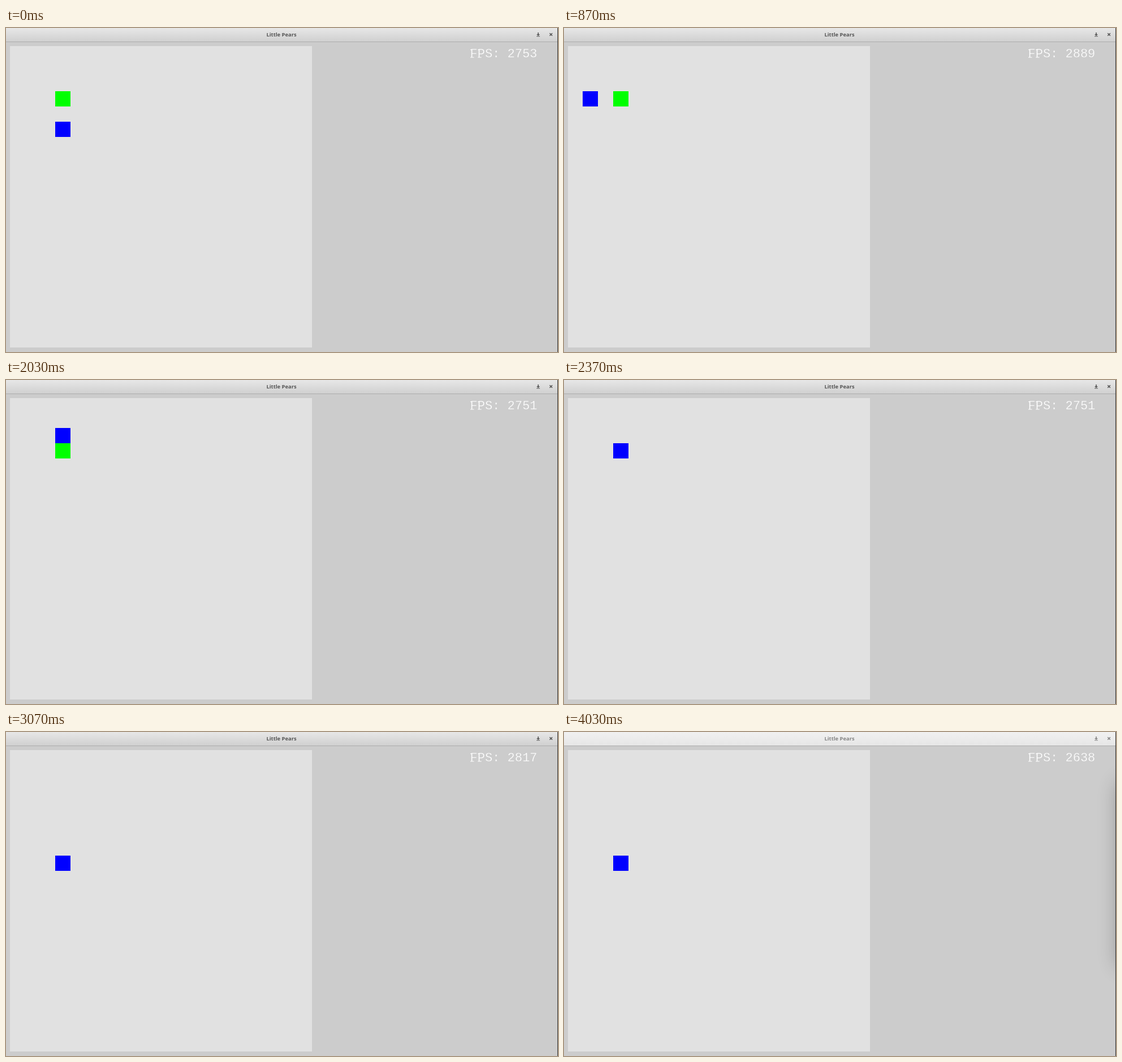
These frames come from a looping animation (976 px wide and 574 px high, 4.46 s). An HTML page:

```html
<!DOCTYPE html>
<html lang="en">
<head>
<meta charset="utf-8">
<title>Little Pears</title>
<style>
  html, body { margin: 0; width: 100%; height: 100%; overflow: hidden; background: #ccc; }
  svg { display: block; overflow: hidden; }
  .title { font: bold 9.4px "Open Sans", "Noto Sans", sans-serif; text-anchor: middle; }
  .fps { font: 22px "Liberation Mono", monospace; fill: #fff; white-space: pre;
    stroke: #ccc; stroke-width: .4px; }
</style>
</head>
<body>
<svg width="976" height="574" viewBox="0 0 976 574">
  <defs>
    <linearGradient id="active" x2="0" y2="1">
      <stop stop-color="#e7e7e7"/><stop offset="1" stop-color="#d0d0d0"/>
    </linearGradient>
    <linearGradient id="idle" x2="0" y2="1">
      <stop stop-color="#f1f1f1"/><stop offset="1" stop-color="#e6e6e6"/>
    </linearGradient>
    <filter id="soft" x="-1" y="-1" width="3" height="3">
      <feGaussianBlur stdDeviation="18"/>
    </filter>
    <g id="bar">
      <rect width="976" height="24"/>
      <text class="title" x="487" y="15" fill="currentColor">Little Pears</text>
      <path d="M940.2 8h1.6v3h2.2l-3 3l-3-3h2.2zM938 14.2h6v1h-6z" fill="currentColor"/>
      <path d="M961.3 9.2l4.6 4.6M965.9 9.2l-4.6 4.6" stroke="currentColor" stroke-width="1.6"/>
    </g>
  </defs>

  <use href="#bar" fill="url(#active)" color="#555"/>
  <g id="blurred">
    <use href="#bar" fill="url(#idle)" color="#858585"/>
    <rect x="980" y="90" width="100" height="325" opacity=".3" filter="url(#soft)"/>
  </g>
  <rect y="24" width="976" height="1" fill="#adadad"/>
  <rect x="975" width="1" height="574" fill="#333"/>

  <rect x="7" y="32" width="534" height="534" fill="#e1e1e1"/>
  <rect id="fruit" width="27" height="27" fill="#0f0"/>
  <rect id="player" width="27" height="27" fill="#00f"/>

  <text class="fps" id="fps" x="820.5" y="52.4"></text>
  <path d="M821 52h6.5M834.2 52h6.5M821 38.6h3M834.2 38.6h3" stroke="#fff"/>
</svg>
<script>
const LOOP = 4460, CELL = 26.7, STEP = 207;
const FRUIT = [3, 3], HOME = [3, 5];
const DIRS = { L: [-1, 0], R: [1, 0], U: [0, -1], D: [0, 1] };
const LEGS = [{ start: 200, path: "LLUUUURR" }, { start: 2030, path: "DDDDDD" }];
const RATES = [2753, 2889, 2801, 2751, 2817, 2638];
const el = id => document.getElementById(id);

function place(node, [col, row]) {
  node.setAttribute("x", Math.round(6.7 + col * CELL));
  node.setAttribute("y", Math.round(32 + row * CELL));
}

// Follow the route up to time t, noting whether the fruit was reached.
function walk(t) {
  let [col, row] = HOME, eaten = false;
  for (const { start, path } of LEGS) {
    const count = Math.max(0, Math.floor((t - start) / STEP) + 1);
    for (const key of path.slice(0, count)) {
      col += DIRS[key][0];
      row += DIRS[key][1];
      eaten ||= col === FRUIT[0] && row === FRUIT[1];
    }
  }
  return { pos: [col, row], eaten };
}

function draw(t) {
  const { pos, eaten } = walk(t);
  place(el("player"), pos);
  el("fruit").style.opacity = eaten ? 0 : 1;
  el("fps").textContent = "FPS: " + RATES[Math.floor((t + 970) / 1000)];
  el("blurred").style.opacity = Math.min(1, Math.max(0, (t - 3680) / 40));
}

place(el("fruit"), FRUIT);
const begin = performance.now();
function tick() {
  draw((performance.now() - begin) % LOOP);
  requestAnimationFrame(tick);
}
tick();
</script>
</body>
</html>
```
